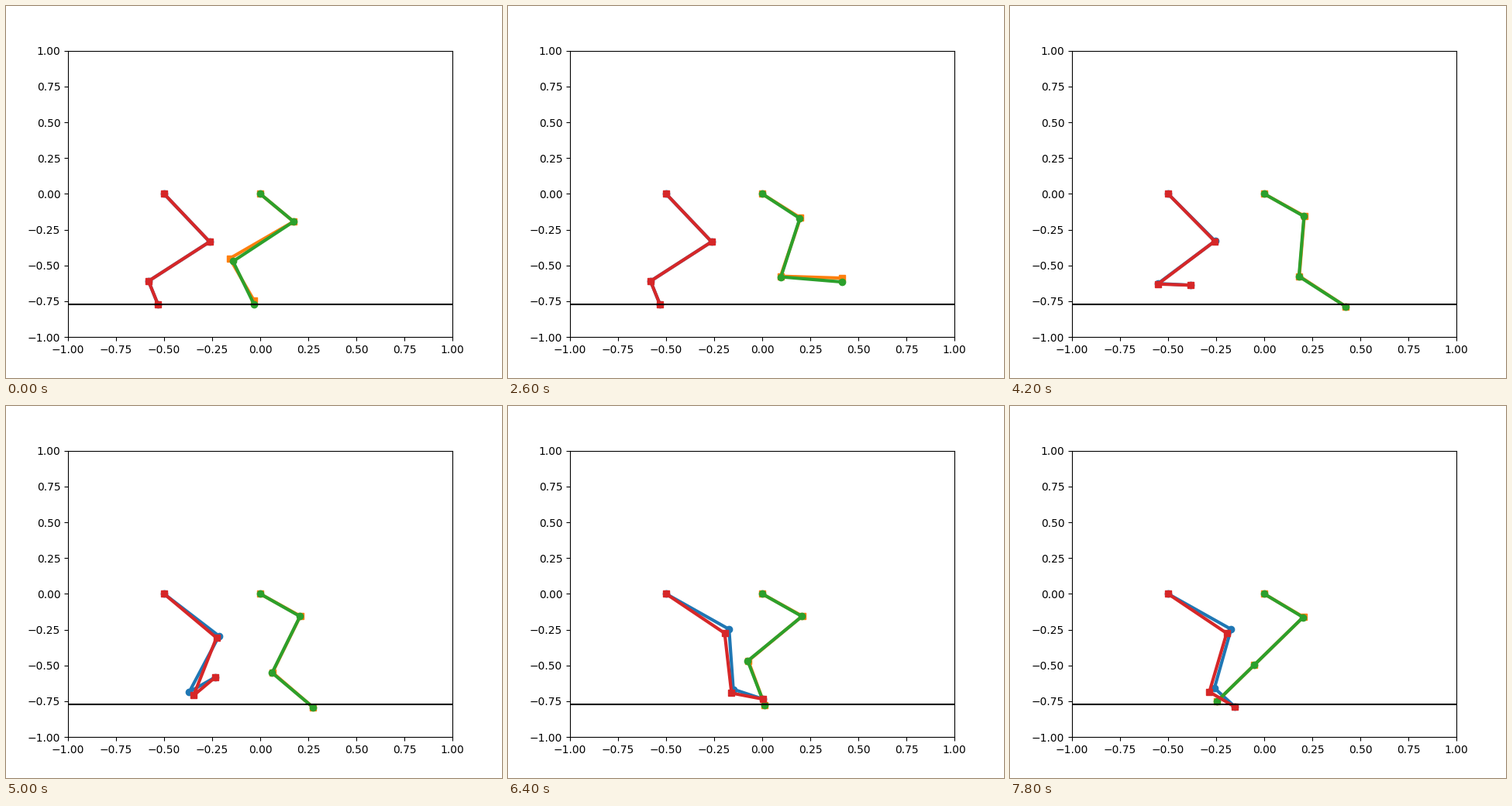
Animation, 640 px wide and 480 px high, one loop 8 s. Source, as a matplotlib script:

```python
import numpy as np
import matplotlib.pyplot as plt
from matplotlib.animation import FuncAnimation

FRAMES = 40
INTERVAL = 200
HALF_STRIDE = 16         # steps from lift-off to touchdown
GROUND = -0.77

STRIDE_SPEED = 0.0373    # foot travel per step
TURN_TIME = 16.1         # moment the foot reverses
TURN_WIDTH = 3           # steps of slowing on either side of it
PRESS = 0.019            # how far a standing foot sinks

# hip x, segment lengths, swing height, step of lift-off
FRONT = dict(hip_x=0.0, links=(0.26, 0.42, 0.32), height=0.222, delay=0)
HIND = dict(hip_x=-0.5, links=(0.41, 0.42, 0.17), height=0.19,
            delay=HALF_STRIDE)

# colour, marker, leg, thigh angles (rest, raised), time span, extra lift
LEGS = [
    ("C0", "o", HIND, (54.7, 37.0), (2, 14), 0),
    ("C1", "s", FRONT, (48.1, 36.6), (0, 19), 0.027),
    ("C2", "o", FRONT, (48.1, 37.2), (2, 19), 0),
    ("C3", "s", HIND, (54.7, 42.0), (2, 14), 0),
]


def smooth(t, start, end):
    u = np.clip((t - start) / (end - start), 0, 1)
    return u * u * (3 - 2 * u)


def thigh_angle(t, angles, span):
    """Swing the thigh up, then start back for the next stride."""
    rest, raised = angles
    back = 2 * HALF_STRIDE + 2
    share = smooth(t, *span) - smooth(t, back, back + HALF_STRIDE)
    return np.radians(rest + (raised - rest) * share)


def foot_position(t, leg, extra):
    """Forward arc in the air, then a straight pull along the ground."""
    u = abs(t - TURN_TIME)
    if u < TURN_WIDTH:
        u = (u * u / TURN_WIDTH + TURN_WIDTH) / 2
    x = leg["hip_x"] - 0.032 + STRIDE_SPEED * (TURN_TIME - u)
    height = leg["height"] if t < HALF_STRIDE else PRESS
    y = GROUND - 0.002 + height * np.sin(np.pi * t / HALF_STRIDE)
    return np.array([x, y + extra * np.clip((20 - t) / 8, 0, 1)])


def leg_joints(t, leg, angles, span, extra):
    """Hip, knee, ankle and foot, with the ankle bent backwards."""
    l1, l2, l3 = leg["links"]
    a = thigh_angle(t, angles, span)
    hip = np.array([leg["hip_x"], 0])
    knee = hip + l1 * np.array([np.cos(a), -np.sin(a)])
    reach = foot_position(t, leg, extra) - knee
    d = np.hypot(*reach)
    u = reach / d
    d = np.clip(d, l2 - l3, l2 + l3)
    along = (l2 ** 2 - l3 ** 2 + d ** 2) / (2 * d)
    side = np.sqrt(max(l2 ** 2 - along ** 2, 0))
    ankle = knee + along * u + side * np.array([u[1], -u[0]])
    return np.array([hip, knee, ankle, knee + d * u])


fig, ax = plt.subplots(figsize=(6.4, 4.8), dpi=100)
ax.set_xlim(-1, 1)
ax.set_ylim(-1, 1)
lines = [ax.plot([], [], color=c, marker=m, lw=3)[0] for c, m, *_ in LEGS]
ax.axhline(GROUND, color="black", lw=1.5)


def update(frame):
    for line, (_, _, leg, *motion) in zip(lines, LEGS):
        t = max(frame - 1 - leg["delay"], 0)
        line.set_data(*leg_joints(t, leg, *motion).T)
    return lines


anim = FuncAnimation(fig, update, frames=FRAMES, interval=INTERVAL,
                     repeat=True, repeat_delay=0)
plt.show()
```
